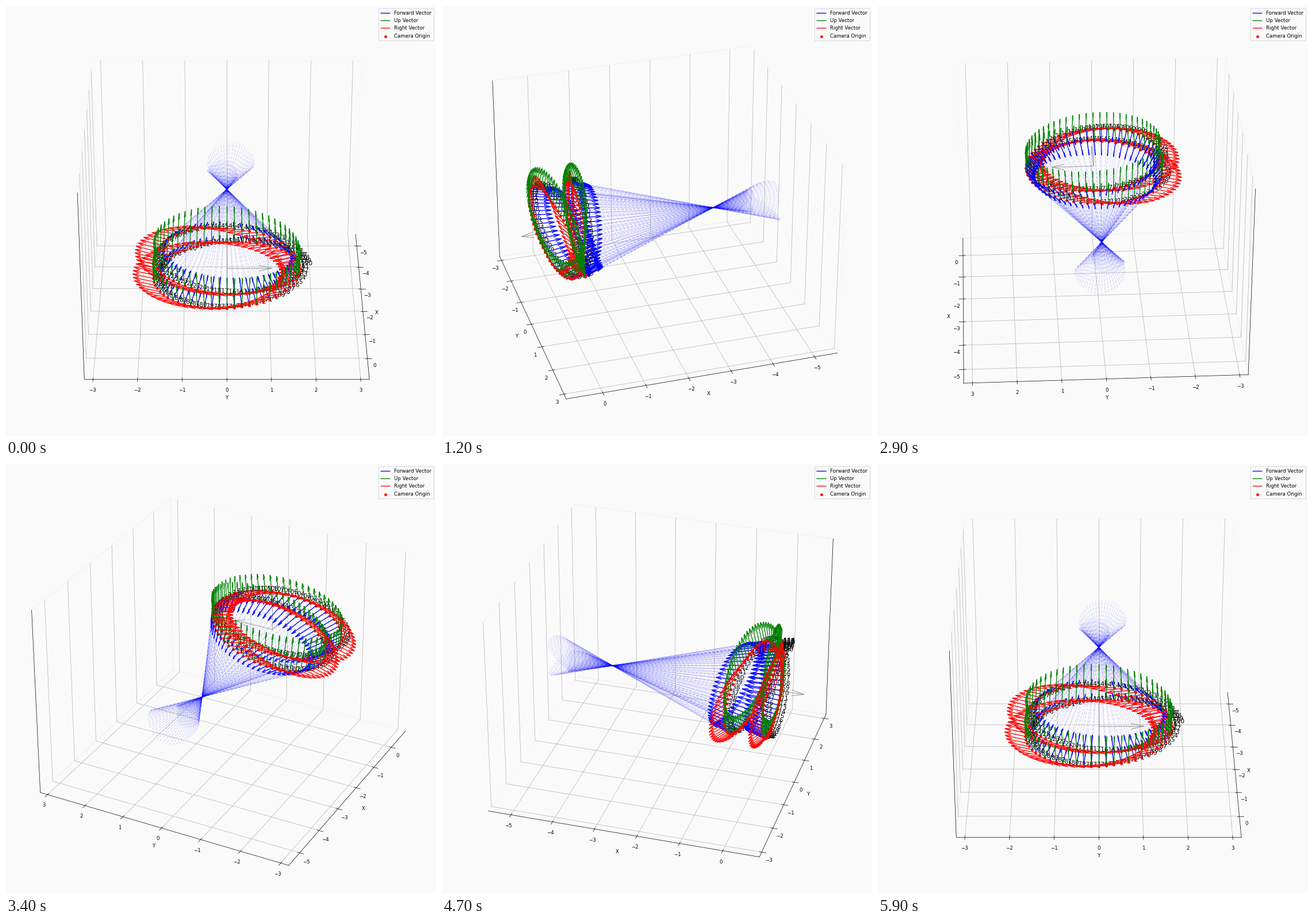
These frames come from a looping animation (748 by 748 pixels, 6000 ms). A matplotlib script:

```python
import numpy as np
import matplotlib.pyplot as plt
from matplotlib.animation import FuncAnimation

SIZE, INCHES = 748, 12
FRAMES, INTERVAL = 60, 100
CAMERAS, TURNS = 120, 2
RADII = 0.434, 1.62, 0.856
TARGET = np.array([-3.573, 0, 0])
ARROW, RAY = 0.5, 5
CENTER_X, HALF = -2.354, 3.195
BACKGROUND = "#fafafa"

plt.rcParams.update({
    "font.family": "DejaVu Sans",
    "font.size": 10,
    "figure.facecolor": BACKGROUND,
    "axes.facecolor": BACKGROUND,
})


def unit(v):
    return v / np.linalg.norm(v, axis=1, keepdims=True)


def spiral_path():
    """Camera positions on two turns that sway along the view axis."""
    t = np.arange(CAMERAS) * 2 * np.pi * TURNS / CAMERAS
    rx, ry, rz = RADII
    return np.column_stack([-rx * np.sin(t / 2), ry * np.cos(t), -rz * np.sin(t)])


def camera_axes(pos):
    """Forward, up and right unit vectors; right leans towards negative y."""
    forward = unit(TARGET - pos)
    right = unit(np.cross([0, 0, 1], forward))
    up = np.cross(forward, right)
    return forward, up, right


def draw_arrows(ax, pos, vec, color, **kwargs):
    ax.quiver(*pos.T, *vec.T, color=color, **kwargs)


fig = plt.figure(figsize=(INCHES, INCHES), dpi=SIZE / INCHES)
ax = fig.add_axes([0, 0, 1, 1], projection="3d")

cams = spiral_path()
forward, up, right = camera_axes(cams)

draw_arrows(ax, np.zeros((3, 3)), np.eye(3), "gray", alpha=0.6)
draw_arrows(ax, cams, ARROW * forward, "blue", label="Forward Vector")
draw_arrows(ax, cams, ARROW * up, "green", label="Up Vector")
draw_arrows(ax, cams, ARROW * right, "red", label="Right Vector")
ax.scatter(*cams.T, color="red", s=20, depthshade=False, label="Camera Origin")

for number, (start, way) in enumerate(zip(cams, forward), 1):
    ax.plot(*np.column_stack([start, start + RAY * way]),
            color="blue", ls="--", lw=1.5, alpha=0.13)
    # the leading space keeps the number clear of its dot
    ax.text(*start, f" {number}", fontsize=12)

ax.set_box_aspect((4, 4, 3))
ax.set_xlim(CENTER_X - HALF, CENTER_X + HALF)
ax.set_ylim(-HALF, HALF)
ax.set_zlim(-0.75 * HALF, 0.75 * HALF)
ax.set_xticks(range(-5, 1))
ax.set_yticks(range(-3, 4))
ax.set_zticks([])
ax.set_xlabel("X")
ax.set_ylabel("Y")
for axis in (ax.xaxis, ax.yaxis, ax.zaxis):
    axis.pane.fill = False
ax.legend(loc="upper right")


def update(i):
    ax.view_init(elev=30, azim=360 * i / (FRAMES - 1))
    return []


anim = FuncAnimation(fig, update, frames=FRAMES, interval=INTERVAL,
                     init_func=lambda: update(0), repeat=True, repeat_delay=0)
plt.show()
```
